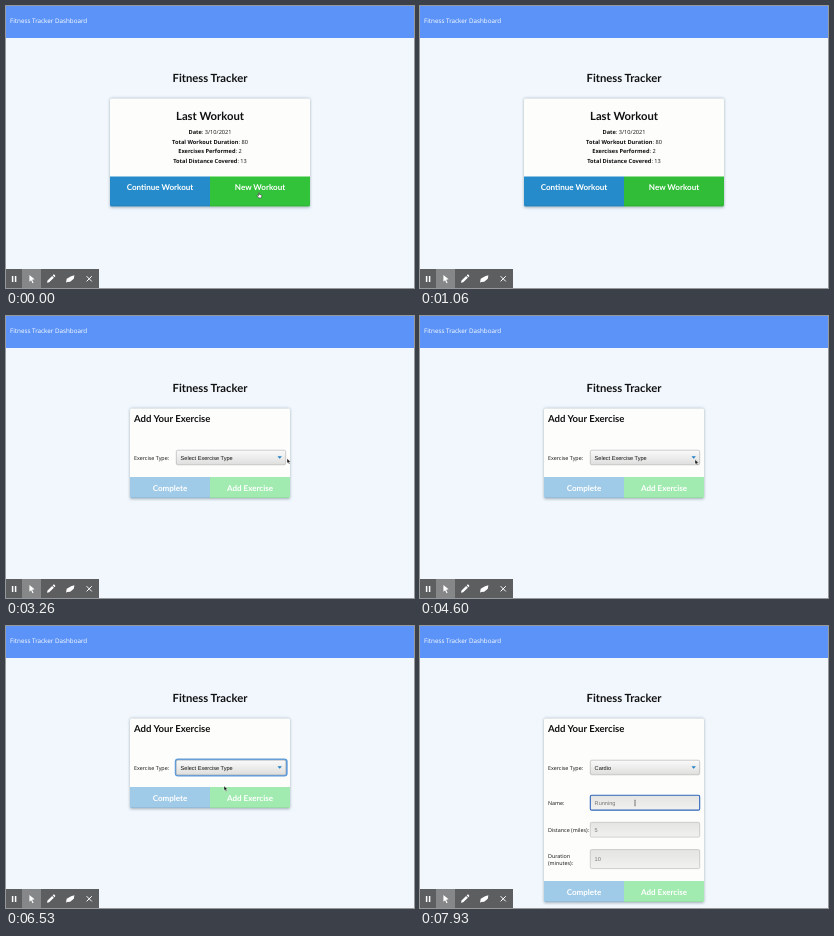
Animation of 408x282 px, one loop 8000 ms. Source, as an HTML page:

```html
<!DOCTYPE html>
<html lang="en">
<head>
<meta charset="utf-8">
<title>Fitness Tracker Dashboard</title>
<style>
html, body { margin: 0; width: 100%; height: 100%; overflow: hidden; background: #f1f7fd; }
svg { display: block; width: 100vw; height: 100vh; }
text { font: 5.65px "Open Sans", "Noto Sans", sans-serif; fill: #111; text-rendering: geometricPrecision; }
.mid { text-anchor: middle; }
.b { font-weight: 700; }
.nav { font-size: 6.27px; fill: #fff; }
.h1, .h2, .btn { font-family: Lato, sans-serif; font-weight: 700; }
.h1 { font-size: 11.25px; }
.h2 { font-size: 9.6px; }
.btn { font-size: 8.05px; fill: #fff; }
.label { font-size: 5.4px; }
.value { font: 5.6px "Liberation Sans", Arial, sans-serif; }
.hint { fill: #777; }
</style>
</head>
<body>
<svg id="stage" viewBox="0 0 408 282" xmlns="http://www.w3.org/2000/svg">
  <defs>
    <linearGradient id="field" x2="0" y2="1">
      <stop stop-color="#fafafa"/><stop offset="1" stop-color="#dedfdd"/>
    </linearGradient>
    <linearGradient id="input" x2="0" y2="1">
      <stop stop-color="#e4e5e3"/><stop offset="1" stop-color="#f1f2ef"/>
    </linearGradient>
    <filter id="soft" x="-10%" y="-10%" width="120%" height="120%"><feGaussianBlur stdDeviation="1.4"/></filter>
  </defs>
  <rect width="408" height="282" fill="#f1f7fd"/>
  <rect width="408" height="32" fill="#5b93f8"/>
  <text class="nav" x="4" y="17">Fitness Tracker Dashboard</text>
  <text class="h1 mid" x="204" y="75.6">Fitness Tracker</text>

  <g id="summary">
    <rect x="104" y="92.5" width="200" height="109" rx="1.5" fill="#8796a3" opacity=".75" filter="url(#soft)"/>
    <rect x="104" y="92.5" width="200" height="108" rx="1.5" fill="#fdfefc"/>
    <text class="h1 mid" x="204" y="113.7">Last Workout</text>
    <g id="stats"></g>
    <path d="M104 170.5h100v30h-98.5q-1.5 0-1.5-1.5z" fill="#268bca"/>
    <path id="newButton" d="M204 170.5h100v28.5q0 1.5-1.5 1.5H204z"/>
    <path d="M104.5 200h199" stroke="#000" stroke-opacity=".12"/>
    <text class="btn mid" x="154" y="184.3">Continue Workout</text>
    <text class="btn mid" x="254" y="184.3">New Workout</text>
  </g>

  <g id="exercise">
    <rect id="shadow" x="124" y="92.5" width="160" rx="1.5" fill="#8796a3" filter="url(#soft)"/>
    <rect id="card" x="124" y="92.5" width="160" rx="1.5" fill="#fdfefc"/>
    <text class="h2" x="128" y="105.8">Add Your Exercise</text>
    <text class="label" x="128" y="143.8">Exercise Type:</text>
    <rect id="ring" x="169.6" y="133.4" width="111.2" height="16.2" rx="2.4" fill="none" stroke="#5d9bdc" stroke-width="1.7"/>
    <rect x="170.3" y="134.2" width="109.4" height="14.6" rx="1.6" fill="url(#field)" stroke="#a9aba9" stroke-width=".6"/>
    <path d="M271.5 140.2h4.4l-2.2 2.5z" fill="#2380c4"/>
    <text id="choice" class="value" x="174.6" y="143.5"></text>
    <g id="fields"></g>
    <rect id="caret" x="174.4" y="173.2" width=".6" height="6.6" fill="#222"/>
    <g id="actions">
      <g id="fills">
        <path d="M124 0h80v21h-78.5q-1.5 0-1.5-1.5z" fill="#9fcae8"/>
        <path d="M204 0h80v19.5q0 1.5-1.5 1.5H204z" fill="#a2ebb0"/>
        <path d="M124.5 20.6h159" stroke="#000" stroke-opacity=".07"/>
      </g>
      <text class="btn mid" x="164" y="13.6">Complete</text>
      <text class="btn mid" x="244" y="13.6">Add Exercise</text>
    </g>
  </g>

  <g id="toolbar">
    <rect y="263" width="93" height="19" fill="#5d5e5f"/>
    <rect x="16" y="263" width="19" height="19" fill="#868788"/>
    <path d="M6.6 270v6M9.6 270v6" stroke="#fff" stroke-width="1.5"/>
    <path d="M23.4 269l5.2 4.3-2.5.4 1.5 3-1.1.5-1.4-3-1.7 1.6z" fill="#fff"/>
    <path d="M41 276.7l.5-2.2 4.6-4.6 1.8 1.8-4.7 4.6zM46.7 269.3l.7-.7q.6-.4 1.2.2l.5.6q.5.6 0 1.1l-.7.7z" fill="#fff"/>
    <path d="M60 276.7l.7-4 4.4-2.5 3.3-.9-.6 3.4-3.6 3-3.1.2z" fill="#fff"/>
    <path d="M80.6 270.2l5.2 5.2M85.8 270.2l-5.2 5.2" stroke="#fff" stroke-width="1"/>
  </g>

  <g id="cursor">
    <path id="arrow" d="M0 0v4.6l1.1-1 .9 1.9.9-.4-.8-1.8h1.5z" fill="#111" stroke="#fff" stroke-width=".4"/>
    <path id="hand" d="M-.5-2.2q.6-.7 1 0v1.7l1.8.4q.6.2.5.9L2.4 2.9H-.3L-2 .6q-.1-.7.6-.5l.9.6z" fill="#fff" stroke="#222" stroke-width=".5"/>
    <path id="beam" d="M-1-2.9q1 0 1 .7v4.4q0 .7-1 .7M1-2.9q-1 0-1 .7v4.4q0 .7 1 .7" fill="none" stroke="#666" stroke-width=".5"/>
  </g>
</svg>
<script>
const LOOP = 8000, TICK = 1000 / 15;
const $ = id => document.getElementById(id);
const set = (id, attrs) => Object.entries(attrs).forEach(([k, v]) => $(id).setAttribute(k, v));
const show = (id, on) => set(id, { visibility: on ? "inherit" : "hidden" });
const ramp = (t, from, to) => Math.min(1, Math.max(0, (t - from) / (to - from)));

const stats = [["Date", "3/10/2021"], ["Total Workout Duration", 80],
  ["Exercises Performed", 2], ["Total Distance Covered", 13]];
$("stats").innerHTML = stats.map(([name, value], i) =>
  `<text class="mid" x="204" y="${128.2 + i * 9.55}"><tspan class="b">${name}</tspan>: ${value}</text>`).join("");

// label lines, value, top, height
const fields = [[["Name:"], "Running", 169.3, 14.8], [["Distance (miles):"], "5", 196.3, 14.8],
  [["Duration", "(minutes):"], "10", 223.6, 19]];
$("fields").innerHTML = fields.map(([lines, value, y, h], i) => {
  const middle = y + h / 2;
  const labels = lines.map((line, n) =>
    `<text class="label" x="128" y="${middle + 2.2 + (n - (lines.length - 1) / 2) * 7.6}">${line}</text>`).join("");
  return `${labels}<rect id="box${i}" x="170.3" y="${y}" width="109.4" height="${h}" rx="1.4"
    fill="url(#input)" stroke="#b4b6b4" stroke-width=".6"/>
    <text class="value hint" x="174.6" y="${middle + 2.1}">${value}</text>`;
}).join("");

// tick, x, y
const trails = [
  { shape: "hand", until: 14, points: [[0, 253, 189], [5, 253, 188]] },
  { shape: "arrow", until: 77, points: [[41, 262, 172], [45, 287, 150], [49, 281, 142.6],
    [53, 277, 143], [55, 276, 143.4], [69, 275, 143.6]] },
  { shape: "arrow", until: 103, points: [[98, 218, 160], [103, 217, 167]] },
  { shape: "beam", until: 120, points: [[103, 216.5, 170], [108, 215, 177]] }
];

function along(points, t) {
  const next = points.findIndex(p => p[0] > t);
  if (next < 0) return points[points.length - 1].slice(1);
  const a = points[next - 1], b = points[next], k = ramp(t, a[0], b[0]);
  return [a[1] + (b[1] - a[1]) * k, a[2] + (b[2] - a[2]) * k];
}

function drawCursor(t) {
  const trail = trails.find(({ points, until }) => t >= points[0][0] && t < until);
  for (const shape of ["arrow", "hand", "beam"]) show(shape, trail && trail.shape === shape);
  if (trail) set("cursor", { transform: `translate(${along(trail.points, t)})` });
}

function draw(ms) {
  const t = Math.floor((ms + 7) / TICK) % 120;
  const onForm = t >= 33, expanded = t >= 99, nameFocus = t >= 111;
  const height = expanded ? 183.5 : 89.5;
  const appear = ramp(t, 33, 35), unhover = ramp(t, 12, 16);

  show("summary", !onForm);
  show("exercise", onForm);
  $("newButton").style.fill = `rgb(${[51 - 2 * unhover, 195 - 6 * unhover, 59 - 4 * unhover].map(Math.round)})`;

  set("card", { height });
  set("shadow", { height: height + 1, opacity: .75 * appear });
  set("fills", { opacity: appear });
  set("actions", { transform: `translate(0 ${92.5 + height - 21})` });
  const shade = Math.round(221 + 34 * appear);
  for (const label of $("actions").querySelectorAll("text")) label.style.fill = `rgb(${shade},${shade},${shade})`;

  $("choice").textContent = expanded ? "Cardio" : "Select Exercise Type";
  show("ring", onForm && !nameFocus);
  set("ring", { opacity: ramp(t, 73, 76) });
  show("fields", expanded);
  set("box0", { stroke: nameFocus ? "#2f64b8" : "#b4b6b4", "stroke-width": nameFocus ? 1.1 : .6 });
  show("caret", nameFocus && t < 119);
  drawCursor(t);
}

const start = performance.now();
function frame() {
  draw((performance.now() - start) % LOOP);
  requestAnimationFrame(frame);
}
frame();
</script>
</body>
</html>
```
